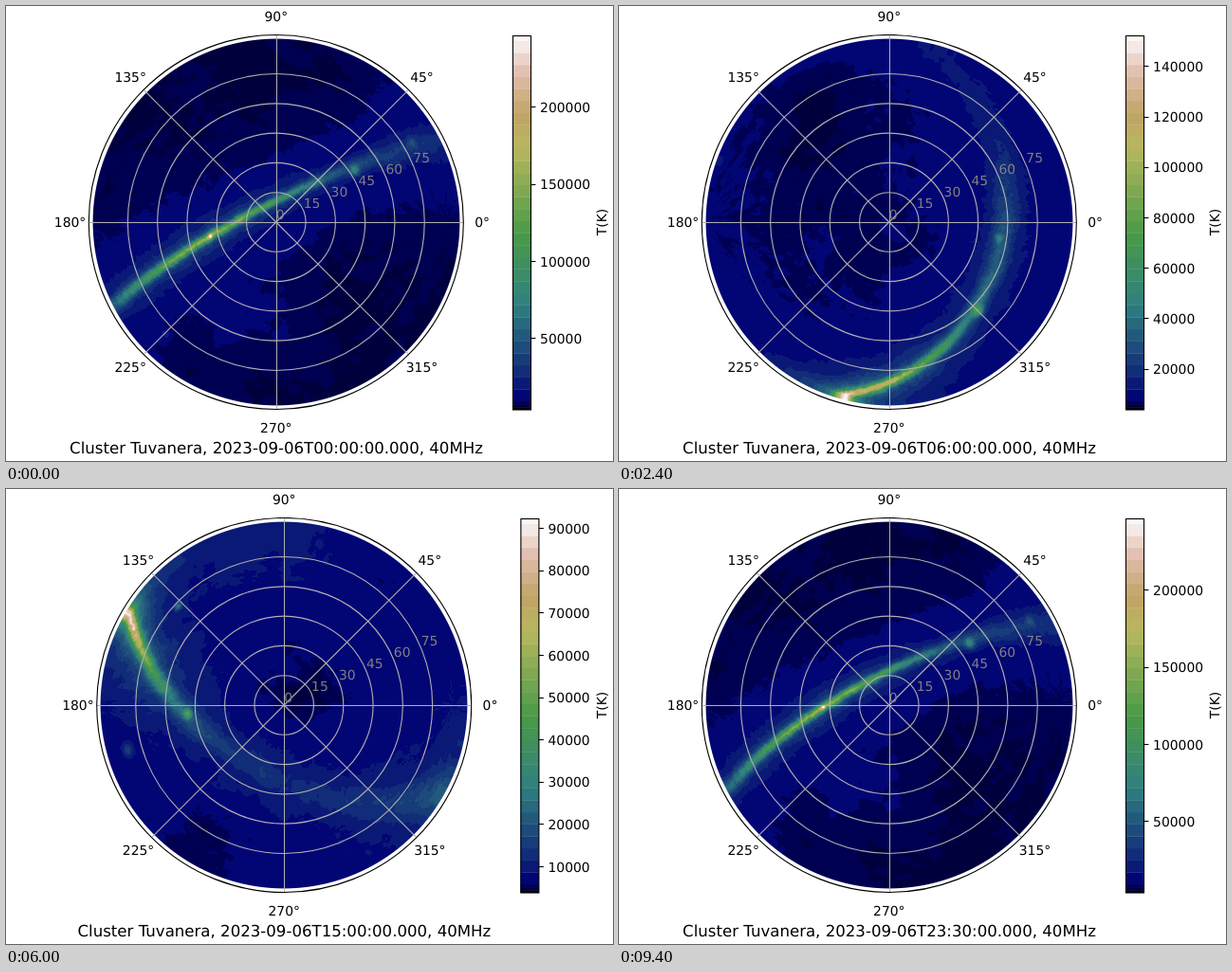
Recreate the animation shown at these times as an HTML page with a canvas. Size 640 by 480 pixels, loop 9.6 s.

```html
<!DOCTYPE html>
<html lang="en">
<head>
<meta charset="utf-8">
<title>Sky temperature</title>
<style>
  html, body { margin: 0; width: 100%; height: 100%; overflow: hidden; background: #fff; }
  canvas, svg { position: absolute; top: 0; left: 0; }
  text { font: 13.89px "DejaVu Sans", sans-serif; text-rendering: geometricPrecision; }
  .title { font-size: 16.6px; }
  .mid { text-anchor: middle; }
  .grid { fill: none; stroke: #b0b0b0; stroke-width: 1.1; }
  .edge { fill: none; stroke: #000; stroke-width: 1.1; }
  .crisp { shape-rendering: crispEdges; }
</style>
</head>
<body>
<canvas id="sky" width="396" height="396"></canvas>
<svg width="640" height="480" viewBox="0 0 640 480">
  <g id="plot">
    <g id="polar" transform="translate(284.8 228)"></g>
    <g id="bar"></g>
    <g id="ticks"></g>
    <text id="title" class="title mid" x="285" y="472"></text>
  </g>
  <text class="mid" transform="translate(632.5 228) rotate(-90)">T(K)</text>
</svg>
<script>
const FRAMES = 48, STEP = 200;
const RAD = Math.PI / 180, LAT = 4.2 * RAD, LST0 = 18.27;
const PX_PER_DEG = 2.086, R_DISC = 193.4, R_AXES = 197.5;
const BAR = { x: 534, y: 31, w: 19.5, h: 395 };
const W = 720, H = 360;
const T_MIN = 3850, T_MAX = 246600;
const $ = id => document.getElementById(id);
const bell = x => Math.exp(-x * x);

function add(parent, tag, attrs, text) {
  const el = document.createElementNS('http://www.w3.org/2000/svg', tag);
  for (const k in attrs) el.setAttribute(k, attrs[k]);
  if (text !== undefined) el.textContent = text;
  parent.appendChild(el);
  return el;
}

// Colour scale: three fine dark bands, then even ones
const STOPS = { 0: '000000', .008: '000038', .03: '000073', .11: '133078', .28: '308080',
  .47: '499a47', .7: 'b7b75e', .79: 'c1a365', .9: 'e0beae', 1: 'fdfbfb' };
const FIRST = .0228, BAND = .0321, DARK = [0, .006, .0135];
const stops = Object.entries(STOPS)
  .map(([f, hex]) => ({ f: +f, rgb: hex.match(/../g).map(h => parseInt(h, 16)) }))
  .sort((a, b) => a.f - b.f);

function colorAt(f) {
  const i = stops.findIndex(s => s.f >= f), b = stops[i], a = stops[i - 1] || b;
  const u = a === b ? 0 : (f - a.f) / (b.f - a.f);
  return a.rgb.map((v, k) => Math.round(v + u * (b.rgb[k] - v)));
}
const bounds = [...DARK];
for (let f = FIRST; f < 1; f += BAND) bounds.push(f);
bounds.push(1);
const colors = bounds.slice(0, -1).map((f, i) => colorAt(i ? (f + bounds[i + 1]) / 2 : 0));

function bandOf(f) {
  if (f >= FIRST) return Math.min(colors.length - 1, 3 + Math.floor((f - FIRST) / BAND));
  return f < DARK[1] ? 0 : f < DARK[2] ? 1 : 2;
}

// Smooth noise, periodic in right ascension
function hash(x, y, s) {
  let n = Math.imul(x, 374761393) ^ Math.imul(y, 668265263) ^ Math.imul(s, 974634777);
  n = Math.imul(n ^ (n >>> 13), 1274126177);
  return ((n ^ (n >>> 16)) >>> 0) / 2147483648 - 1;
}
function noise(ra, dec, size) {
  const n = Math.round(360 / size), u = ra / 360 * n, v = (dec + 90) / size;
  const i = Math.floor(u), j = Math.floor(v);
  const ease = t => t * t * (3 - 2 * t), a = ease(u - i), b = ease(v - j);
  const h = (x, y) => hash((x + n) % n, y, n);
  const top = h(i, j) + a * (h(i + 1, j) - h(i, j));
  const low = h(i, j + 1) + a * (h(i + 1, j + 1) - h(i, j + 1));
  return top + b * (low - top);
}

// RA in hours, declination and radius in degrees, strength in kK
function spot(ra, dec, radius, kK) {
  const a0 = ra * 15 * RAD, d0 = dec * RAD, r = radius * RAD;
  return (a, d) => {
    const c = Math.sin(d) * Math.sin(d0) + Math.cos(d) * Math.cos(d0) * Math.cos(a - a0);
    return kK * Math.exp((c - 1) / (r * r));
  };
}
const sources = [
  spot(17.76, -29, .8, 105),
  spot(20.45, 41.5, 1.7, 44),
  spot(23.35, 59.2, 1.4, 18),
  spot(8.95, -44.5, 1.5, 27),
  spot(13.48, -42.5, 1.2, 17),
  spot(5.75, -70, 1.6, 9)
];
const patches = [
  spot(9.5, 16, 17, -1.9),
  spot(4, -30, 16, -1.6),
  spot(15.3, -4, 19, 3)
];
const sum = (list, a, d) => list.reduce((t, f) => t + f(a, d), 0);

// Galactic plane ridge, with the outer arm on the northern side
const ridge = l => 5 + 141 * bell(l / 56) + 16 * bell((l - 105) / 36);

function temperature(ra, dec) {
  const a = ra * RAD, d = dec * RAD, sd = Math.sin(d), cd = Math.cos(d);
  const g = a - 192.86 * RAD, sg = Math.sin(27.13 * RAD), cg = Math.cos(27.13 * RAD);
  const b = Math.abs(Math.asin(sd * sg + cd * cg * Math.cos(g))) / RAD;
  const turn = Math.atan2(cd * Math.sin(g), sd * cg - cd * sg * Math.cos(g)) / RAD;
  const l = (662.93 - turn) % 360 - 180;
  const outer = (1 - Math.cos(l * RAD)) / 2, w = 1 + .8 * outer + 4 * outer * outer;
  const n1 = noise(ra, dec, 12), n2 = noise(ra, dec, 4), n3 = noise(ra, dec, 1.5);
  const halo = 6.6 + (5.5 - 4.3 * outer) * Math.exp(-b / 17) + sum(patches, a, d);
  const slope = .6 * bell(b / (1.7 * w)) + .32 * Math.exp(-b / (3.6 * w)) + .08 * Math.exp(-b / (11 * w));
  const kK = halo * (1 + .1 * n1 + .08 * n2 + .04 * n3)
    + ridge(l) * slope * (1 + .08 * n2 + .1 * n3)
    + sum(sources, a, d);
  return Math.min(T_MAX, Math.max(T_MIN, 1000 * kK));
}

const map = new Float32Array(W * H);
for (let y = 0; y < H; y++)
  for (let x = 0; x < W; x++) map[y * W + x] = temperature(x / 2, y / 2 - 90);

// Every disc pixel has a fixed declination and hour angle
const ctx = $('sky').getContext('2d'), SIZE = 396, img = ctx.createImageData(SIZE, SIZE);
const cells = [];
for (let y = 0; y < SIZE; y++) {
  for (let x = 0; x < SIZE; x++) {
    const dx = x + .5 - SIZE / 2, dy = y + .5 - SIZE / 2, r = Math.hypot(dx, dy);
    const alpha = Math.min(1, R_DISC + .5 - r);
    if (alpha <= 0) continue;
    const z = Math.min(90, r / PX_PER_DEG) * RAD;
    const north = Math.sin(z) * dx / r, east = -Math.sin(z) * dy / r, up = Math.cos(z);
    const dec = Math.asin(north * Math.cos(LAT) + up * Math.sin(LAT)) / RAD;
    const ha = Math.atan2(-east, up * Math.cos(LAT) - north * Math.sin(LAT)) / RAD;
    const at = (y * SIZE + x) * 4;
    img.data[at + 3] = 255 * alpha;
    cells.push({ at, row: Math.min(H - 1, Math.round((dec + 90) * 2)) * W, ha: ha * 2 });
  }
}
const temps = new Float32Array(cells.length);

function drawAxes() {
  const polar = $('polar'), bar = $('bar');
  for (let k = 1; k <= 5; k++) add(polar, 'circle', { r: 15 * k * PX_PER_DEG, class: 'grid' });
  for (let deg = 0; deg < 360; deg += 45) {
    const c = Math.cos(deg * RAD), s = -Math.sin(deg * RAD);
    const o = deg % 90 ? 0 : .5;
    add(polar, 'line', {
      x1: o, y1: o, x2: R_AXES * c + o, y2: R_AXES * s + o, class: o ? 'grid crisp' : 'grid'
    });
    add(polar, 'text', { x: 217.3 * c, y: 217 * s + 5, class: 'mid' }, deg + '°');
  }
  add(polar, 'circle', { r: R_AXES, class: 'edge' });
  for (let k = 0; k <= 5; k++) {
    const r = 15 * k * PX_PER_DEG, a = 22.5 * RAD;
    add(polar, 'text', { x: r * Math.cos(a), y: -r * Math.sin(a) - 3, fill: '#808080' }, 15 * k);
  }
  colors.forEach((c, i) => add(bar, 'rect', {
    x: BAR.x, width: BAR.w, y: BAR.y + BAR.h * (1 - bounds[i + 1]),
    height: BAR.h * (bounds[i + 1] - bounds[i]) + (i ? .3 : 0), fill: `rgb(${c})`
  }));
  add(bar, 'rect', { x: BAR.x + .5, y: BAR.y + .5, width: BAR.w - .5, height: BAR.h - .5, class: 'edge' });
}

function drawTicks(hi) {
  const ticks = $('ticks'), span = hi - T_MIN, raw = span / 9, mag = 10 ** Math.floor(Math.log10(raw));
  const step = mag * [1, 2, 2.5, 5, 10].find(m => m * mag >= raw);
  ticks.replaceChildren();
  for (let v = step; v <= hi; v += step) {
    const y = BAR.y + BAR.h * (hi - v) / span, x = BAR.x + BAR.w;
    const snap = Math.floor(y) + .5;
    add(ticks, 'line', { x1: x, x2: x + 5, y1: snap, y2: snap, class: 'edge' });
    add(ticks, 'text', { x: x + 9.6, y: y + 5.2 }, v);
  }
}

function draw(i) {
  const hours = i / 2, lst = ((LST0 + hours * 1.00274) * 30) % W;
  let hi = 0;
  cells.forEach((c, k) => {
    temps[k] = map[c.row + (Math.round(lst - c.ha) + 2 * W) % W];
    hi = Math.max(hi, temps[k]);
  });
  cells.forEach((c, k) => {
    const rgb = colors[bandOf((temps[k] - T_MIN) / (hi - T_MIN))];
    for (let n = 0; n < 3; n++) img.data[c.at + n] = rgb[n];
  });
  ctx.putImageData(img, 0, 0);

  // Shorter tick labels leave room, so the plot moves right
  const shift = hi < 100000 ? 8.4 : 0;
  $('sky').style.transform = `translate(${Math.round(285 - SIZE / 2 + shift)}px, ${228 - SIZE / 2}px)`;
  $('plot').setAttribute('transform', `translate(${shift} 0)`);
  drawTicks(hi);
  const hh = String(Math.floor(hours)).padStart(2, '0'), mm = i % 2 ? '30' : '00';
  $('title').textContent = `Cluster Tuvanera, 2023-09-06T${hh}:${mm}:00.000, 40MHz`;
}

let shown = -1;
const start = performance.now();
function tick() {
  const i = Math.floor((performance.now() - start) / STEP) % FRAMES;
  if (i !== shown) draw(shown = i);
  requestAnimationFrame(tick);
}
drawAxes();
tick();
</script>
</body>
</html>
```
